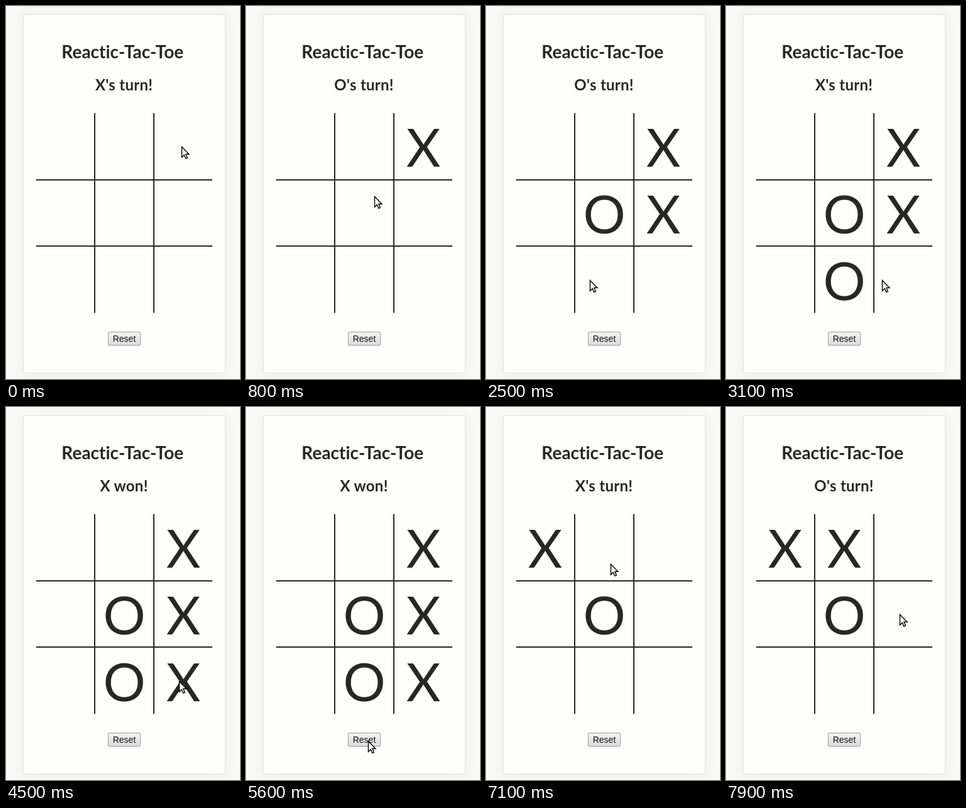
An HTML page for the animation above (8 s loop, 372x592 px).

```html
<!DOCTYPE html>
<html lang="en">
<head>
<meta charset="utf-8">
<title>Reactic-Tac-Toe</title>
<style>
  html, body { margin: 0; width: 100%; height: 100%; overflow: hidden; background: #f9faf6; }
  .card {
    position: absolute; left: 27px; top: 13px; width: 320px; height: 568px;
    background: #fefffb; border: 1px solid #dfe1db; border-radius: 2px;
    box-shadow: 0 2px 24px rgba(0, 0, 0, .06);
  }
  svg { position: absolute; left: 0; top: 0; }
  text { text-anchor: middle; font-family: Lato, sans-serif; fill: #272822; }
  .heading { font-weight: 700; font-variant-ligatures: none; }
  #status { font-size: 24px; letter-spacing: .25px; }
  .mark { font-size: 84px; }
  .grid { stroke: #272822; stroke-width: 2; }
  .label { font: 14px "Liberation Sans", Arial, sans-serif; fill: #111; }
</style>
</head>
<body>
<div class="card"></div>
<svg width="372" height="592" viewBox="0 0 372 592">
  <defs>
    <linearGradient id="face" x2="0" y2="1">
      <stop offset="0" stop-color="#f3f3f3"/>
      <stop offset="1" stop-color="#dcdcdc"/>
    </linearGradient>
  </defs>
  <text class="heading" x="185.3" y="83" font-size="28">Reactic-Tac-Toe</text>
  <text class="heading" x="187.6" y="134" id="status"></text>
  <path class="grid" d="M141 170V487M235 170V487M48 276H328M48 381H328"/>
  <g id="board"></g>
  <rect id="button" x="162.5" y="517.5" width="51" height="21" rx="1.5" fill="url(#face)"/>
  <text class="label" x="188" y="533">Reset</text>
  <path id="cursor" d="M.5 .5V17L4.3 13.4L6.8 19.2L9.4 18.1L6.9 12.3H12Z" fill="#fff" stroke="#000" stroke-width="1.4"/>
</svg>
<script>
const LOOP = 8000, STEP = 100, CELL_W = 94, CELL_H = 106, LEFT = 48, TOP = 170;

// Where the pointer clicks and when; the clicked place decides what happens.
const start = { at: 0, x: 279, y: 223 };
const clicks = [
  [600, 279, 218], [1100, 195, 313], [1800, 265, 326], [2900, 165, 435],
  [4500, 275, 435], [5200, 275, 435], [6000, 194, 530], [6700, 96, 232],
  [7000, 190, 305], [7300, 200, 235], [LOOP, 276, 329]
].map(([at, x, y]) => ({ at, x, y }));

const byId = id => document.getElementById(id);
const cells = Array.from({ length: 9 }, (_, i) => {
  const cell = document.createElementNS("http://www.w3.org/2000/svg", "text");
  cell.setAttribute("class", "mark");
  cell.setAttribute("x", LEFT + CELL_W * (i % 3 + .5) - 1);
  cell.setAttribute("y", TOP + 85 + CELL_H * Math.floor(i / 3));
  return byId("board").appendChild(cell);
});

function findWinner(board) {
  const owns = (player, first, step) => [0, 1, 2].every(n => board[first + n * step] === player);
  return ["X", "O"].find(player =>
    [0, 1, 2].some(n => owns(player, 3 * n, 1) || owns(player, n, 3)) ||
    owns(player, 0, 4) || owns(player, 2, 2));
}

function gameAt(time) {
  const board = Array(9).fill("");
  let player = "X", focused = false;
  for (const { x, y } of clicks.filter(click => click.at <= time)) {
    const row = Math.floor((y - TOP) / CELL_H);
    const cell = 3 * row + Math.floor((x - LEFT) / CELL_W);
    focused = row > 2;
    if (focused) {
      board.fill("");
      player = "X";
    } else if (!board[cell] && !findWinner(board)) {
      board[cell] = player;
      player = player === "X" ? "O" : "X";
    }
  }
  const winner = findWinner(board);
  return { board, focused, status: winner ? `${winner} won!` : `${player}'s turn!` };
}

// After each click the pointer heads for the next place, then rests there.
function pointerAt(time) {
  const next = clicks.findIndex(click => click.at > time);
  const from = clicks[next - 1] || start, to = clicks[next];
  const travel = Math.min(400, .6 * (to.at - from.at));
  const k = Math.min(1, (time - from.at) / travel);
  const ease = k * (2 - k);
  return ["x", "y"].map(axis => Math.round(from[axis] + (to[axis] - from[axis]) * ease));
}

function draw() {
  const time = Math.floor(performance.now() % LOOP / STEP) * STEP;
  const { board, focused, status } = gameAt(time);
  cells.forEach((cell, i) => cell.textContent = board[i]);
  byId("status").textContent = status;
  byId("button").setAttribute("stroke", focused ? "#6c6c6c" : "#9c9c9c");
  byId("cursor").setAttribute("transform", `translate(${pointerAt(time)})`);
  requestAnimationFrame(draw);
}
draw();
</script>
</body>
</html>
```
